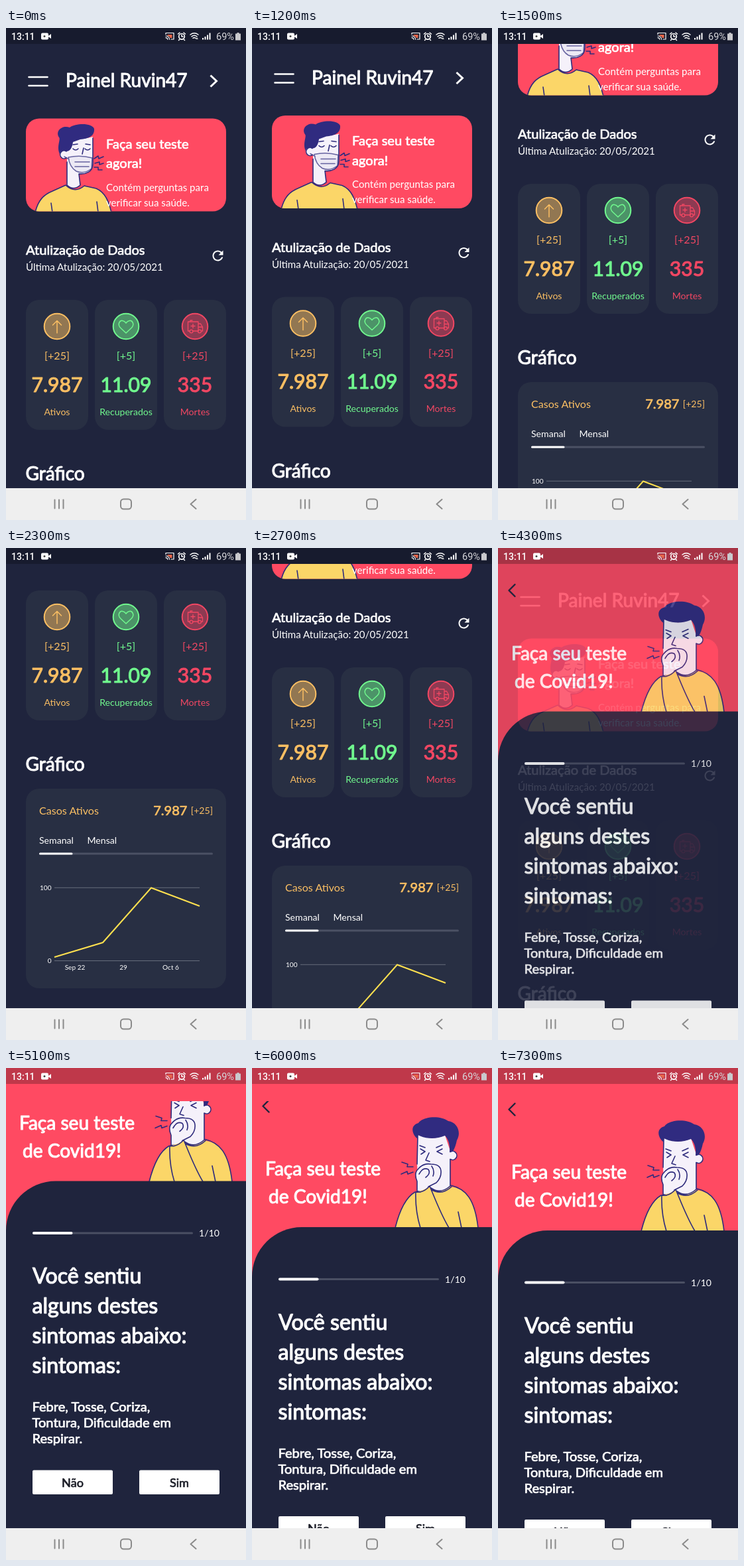
Recreate the animation shown at these times as an HTML page. Size 362x742 px, loop 7.4 s.

```html
<!DOCTYPE html>
<html lang="pt">
<head>
<meta charset="utf-8">
<title>Painel</title>
<style>
  html, body { margin: 0; width: 100%; height: 100%; overflow: hidden; background: #1f243d; }
  svg { display: block; }
  text { font-family: Lato, sans-serif; fill: currentColor; white-space: pre; }
  .bold { stroke: currentColor; stroke-width: .037em; stroke-linejoin: round; }
  .mid { text-anchor: middle; }
  .end { text-anchor: end; }
  .line { fill: none; stroke: currentColor; stroke-linecap: round; stroke-linejoin: round; }
  .ink { fill: none; stroke: #2d2a7c; stroke-width: 1.6; stroke-linecap: round; stroke-linejoin: round; }
  .hair { fill: #302b80; }
  .skin { fill: #f5f1fa; }
  .shirt { fill: #fbd668; }
  .white { color: #fff; }
  .navy { color: #1f243d; }
  .orange { color: #fbbf63; }
  .green { color: #70f88e; }
  .red { color: #f24763; }
  .f10 { font-size: 10.1px; }
  .f14 { font-size: 14.1px; }
  .f15 { font-size: 15.1px; }
  .f16 { font-size: 16.1px; }
  .f18 { font-size: 18.1px; }
  .f20 { font-size: 20.1px; }
  .f28 { font-size: 28.1px; }
  .f30 { font-size: 30.1px; }
  .f32 { font-size: 32.2px; }
  .status text { font-family: Roboto, sans-serif; }
</style>
</head>
<body>
<svg width="362" height="742" viewBox="0 0 362 742" class="white">
  <defs>
    <clipPath id="homeClip"><rect y="24" width="362" height="670"/></clipPath>
    <clipPath id="quizClip"><rect y="50" width="362" height="700"/></clipPath>
    <clipPath id="bannerClip"><rect x="30" y="136.5" width="302" height="140" rx="20"/></clipPath>
    <g id="tile">
      <rect width="94" height="196" rx="20" fill="#282f43"/>
      <circle cx="47" cy="40" r="19.3" fill="currentColor" fill-opacity=".5" stroke="currentColor" stroke-width="2"/>
    </g>
  </defs>

  <rect width="362" height="694" fill="#1f243d"/>

  <g clip-path="url(#homeClip)">
    <g id="home">
      <path class="line" stroke-width="2.6" d="M34.500 74H62.500M34.500 87H62.500"/>
      <text class="bold f28" x="90" y="89">Painel Ruvin47</text>
      <path class="line" stroke-width="3" style="stroke-linecap:butt;stroke-linejoin:miter" d="M308.500 71.500L317.500 80L308.500 88.500"/>

      <g clip-path="url(#bannerClip)">
        <rect x="30" y="136" width="302" height="141" fill="#ff4a62"/>
        <path class="shirt" d="M44 278C49 258 58 251 70 246L90 237Q104 250 118 238L136 242C150 248 155 262 159 278Z"/>
        <path class="ink" d="M44 278C49 258 58 251 70 246L90 237Q104 250 118 238L136 242C150 248 155 262 159 278M70 278L68 264M139 278L137 262"/>
        <path class="skin" d="M86 172C100 166 118 168 131 164V205C131 217 120 221 110 220L112 237Q102 246 92 237V198Z"/>
        <path class="ink" d="M131 166V205C131 217 120 221 110 220L112 237Q102 246 92 237V202"/>
        <path class="hair" d="M82 192C75 180 83 168 80 165C74 156 84 146 96 150C106 143 130 143 133 152C134 163 124 167 112 168L101 172C100 180 97 186 91 186Z"/>
        <circle class="skin" cx="87" cy="191" r="6"/>
        <path class="ink" d="M91 186A6 6 0 1 0 91 196"/>
        <path d="M94 195Q112 192 130 196L129 212Q118 221 106 216Q96 210 94 195Z" fill="#ece9f4"/>
        <path class="ink" stroke-opacity=".7" d="M94 195Q112 191 130 196L129 212Q118 221 106 216Q96 210 94 195ZM104 202H126M104 209H125M88 194L95 198"/>
        <path class="ink" d="M101 182Q105 186 109 182M119 182Q123 186 127 182M101 176L108 175M120 175L127 176M117 181L115 190"/>
        <path class="ink" d="M133 197L139 193L140 197L147 194M134 204L141 202L141 206L147 204M133 210L139 210L139 214L145 214"/>
        <text class="bold f20" x="151" y="181.500">Faça seu teste</text>
        <text class="bold f20" x="151" y="211">agora!</text>
        <text class="f15" x="151" y="245.800">Contém perguntas para</text>
        <text class="f15" x="151" y="268.800">verificar sua saúde.</text>
      </g>

      <text class="bold f20" x="30" y="342">Atulização de Dados</text>
      <text class="f15" x="30" y="366">Última Atulização: 20/05/2021</text>
      <path transform="translate(307.500 331.500)" fill="#fff" d="M17.650 6.350C16.200 4.900 14.210 4 12 4c-4.420 0-7.990 3.580-7.990 8s3.570 8 7.990 8c3.730 0 6.840-2.550 7.730-6h-2.080c-.82 2.330-3.040 4-5.650 4-3.310 0-6-2.690-6-6s2.690-6 6-6c1.660 0 3.140.69 4.220 1.780L13 11h7V4z"/>

      <g class="orange" transform="translate(30 410)">
        <use href="#tile"/>
        <path class="line" stroke-width="1.500" d="M47 50V31.500M40.500 38L47 31.500L53.500 38"/>
        <text class="mid f16" x="47" y="90">[+25]</text>
        <text class="mid bold f30" x="47" y="138.800">7.987</text>
        <text class="mid f14" x="47" y="173.500">Ativos</text>
      </g>
      <g class="green" transform="translate(134 410)">
        <use href="#tile"/>
        <path class="line" stroke-width="1.500" d="M47 50L39 42.500C33 36.500 38 30.500 42 31.500Q45 32 47 35Q49 32 52 31.500C56 30.500 61 36.500 55 42.500Z"/>
        <text class="mid f16" x="47" y="90">[+5]</text>
        <text class="mid bold f30" x="47" y="138.800">11.09</text>
        <text class="mid f14" x="47" y="173.500">Recuperados</text>
      </g>
      <g class="red" transform="translate(238 410)">
        <use href="#tile"/>
        <path class="line" stroke-width="1.300" d="M39 47H36.500V33H52V47H44M52 36H55.500L58.500 41V47H57M52 41H58M44 36.500V42.500M41 39.500H47M40 33V31H43"/>
        <circle class="line" stroke-width="1.300" cx="41.500" cy="47.500" r="2.400"/>
        <circle class="line" stroke-width="1.300" cx="54" cy="47.500" r="2.400"/>
        <text class="mid f16" x="47" y="90">[+25]</text>
        <text class="mid bold f30" x="47" y="138.800">335</text>
        <text class="mid f14" x="47" y="173.500">Mortes</text>
      </g>

      <text class="bold f28" x="29.500" y="682">Gráfico</text>
      <rect x="30" y="709" width="302" height="301" rx="20" fill="#282f43"/>
      <g class="orange">
        <text class="f16" x="50" y="747.500">Casos Ativos</text>
        <text class="end bold f20" x="273.500" y="749">7.987</text>
        <text class="end f14" x="312" y="746.500">[+25]</text>
      </g>
      <text class="f14" x="50" y="792">Semanal</text>
      <text class="f14" x="122.500" y="792">Mensal</text>
      <rect x="50" y="805.500" width="262" height="3" rx="1.500" fill="#4b5164"/>
      <rect x="50" y="805.500" width="50.500" height="3" rx="1.500" fill="#fff"/>
      <path d="M73 858.300H292M73 968.500H292" stroke="#666c7b" fill="none"/>
      <path d="M73 963L146 941L219 858.500L292 886" stroke="#ffe14f" stroke-width="2" fill="none"/>
      <g class="f10">
        <text class="end" x="68.500" y="861.800">100</text>
        <text class="end" x="68.500" y="972">0</text>
        <text class="mid" x="104" y="981.700">Sep 22</text>
        <text class="mid" x="177" y="981.700">29</text>
        <text class="mid" x="248.500" y="981.700">Oct 6</text>
      </g>
    </g>
    <ellipse id="glowTop" cx="181" cy="24" rx="270" ry="17" fill="#2f80b4"/>
    <ellipse id="glowBottom" cx="181" cy="694" rx="270" ry="17" fill="#2f80b4"/>
  </g>

  <g id="quiz">
    <rect width="362" height="742" fill="#ff4a62"/>
    <g clip-path="url(#quizClip)">
      <g id="quizPage">
        <path class="line navy" stroke-width="2.400" d="M25.500 53.500L16.500 62.500L25.500 71.500"/>
        <text class="bold f28" x="20" y="167">Faça seu teste</text>
        <text class="bold f28" x="25" y="209">de Covid19!</text>

        <path class="shirt" d="M216 246C222 222 232 200 246 192L268 184H300C322 187 336 202 341 246Z"/>
        <path class="ink" d="M216 246C222 222 232 200 246 192M300 182C322 187 336 202 341 246M316 246L311 222"/>
        <path class="skin" d="M250 104C264 113 278 112 291 106L299 130V184Q285 196 268 186L260 176Q249 170 249 150Z"/>
        <path class="ink" d="M250 106L249 150M299 143V183Q284 196 270 186"/>
        <circle class="skin" cx="302" cy="137" r="6.500"/>
        <path class="ink" d="M299 131.500A6.500 6.500 0 1 1 299 142.500"/>
        <path class="hair" d="M250 112C240 104 239 91 251 88C257 78 284 76 296 85C310 87 316 102 309 114Q307 124 303 131L298 132C299 120 296 112 291 107C277 113 262 112 250 106Z"/>
        <path class="ink" d="M254 127L261 131L255 135M287 127L279 131L287 135M253 122L261 125M278 125L287 121M267 133L262 144L268 146"/>
        <path class="shirt" d="M247 192L268 183C276 202 284 224 297 246H254Q246 220 247 192Z"/>
        <path class="ink" d="M247 192L268 183C276 202 284 224 297 246M247 192Q246 220 254 246M247 192Q258 194 268 183M270 188Q286 198 301 184"/>
        <path class="skin" d="M249 190V176Q244 164 250 158Q258 148 270 150Q284 150 285 160Q286 170 278 178L266 184Q258 191 249 190Z"/>
        <path class="ink" d="M249 190V176Q244 164 250 158Q258 148 270 150Q284 150 285 160Q286 170 278 178L266 184M252 165Q258 154 266 158Q270 164 262 170M271 153Q276 160 273 168"/>
        <path class="ink" d="M226 147L235 150L234 154L243 154M225 165L234 161L235 165L243 162"/>

        <path d="M0 800V320A75 75 0 0 1 75 245H362V800Z" fill="#1f243d"/>
        <rect x="40" y="322" width="242" height="3" rx="1.500" fill="#4a4f63"/>
        <rect x="40" y="321.500" width="60.500" height="4" rx="2" fill="#fff"/>
        <text class="end f14" x="322" y="328.500">1/10</text>
        <g class="bold f32">
          <text x="40" y="399.500">Você sentiu</text>
          <text x="39.500" y="444.500">alguns destes</text>
          <text x="39.500" y="489.500">sintomas abaixo:</text>
          <text x="39.500" y="534.500">sintomas:</text>
        </g>
        <g class="bold f20">
          <text x="39.500" y="592.500">Febre, Tosse, Coriza,</text>
          <text x="39.500" y="616.700">Tontura, Dificuldade em</text>
          <text x="39.500" y="640.800">Respirar.</text>
        </g>
        <rect x="40" y="681" width="121" height="36.500" rx="2" fill="#fff"/>
        <rect x="201" y="681" width="121" height="36.500" rx="2" fill="#fff"/>
        <g class="mid bold f18" color="#1a1c26">
          <text x="100.500" y="706">Não</text>
          <text x="261.500" y="706">Sim</text>
        </g>
      </g>
    </g>
  </g>

  <g class="status">
    <rect width="362" height="24" fill="#000" fill-opacity=".25"/>
    <text x="8" y="17.500" font-size="14" font-weight="500">13:11</text>
    <rect x="53" y="7.500" width="11" height="10" rx="2" fill="#fff"/>
    <path d="M63 12.500L68 9V16Z" fill="#fff"/>
    <circle cx="58" cy="12.500" r="1.500" fill="#444"/>
    <path d="M243.500 10H250.500V15H247.500Q247 12 243.500 11.500Z" fill="#e8674a"/>
    <path class="line" stroke-width="1.200" d="M241 9.500V7.500H253V17H249M241 12Q246 12 246.500 17.200M241 14.700Q243.500 14.700 243.800 17.200"/>
    <circle class="line" stroke-width="1.700" cx="265" cy="12.800" r="4.300"/>
    <path class="line" stroke-width="1.500" d="M259.500 9L262 7M270.500 9L268 7M265 10.500V13H267M261.500 17.500L260.500 18.500M268.500 17.500L269.500 18.500"/>
    <path class="line" stroke-width="1.500" d="M278 10Q284 5.500 290 10M280 12.800Q284 9.800 288 12.800M282 15.300Q284 13.800 286 15.300"/>
    <path d="M288 14L290 17H286Z" fill="#ccc"/>
    <path d="M297 17.500V15M300.500 17.500V13M304 17.500V10.500M307.500 17.500V7.500" stroke="#fff" stroke-width="2"/>
    <text x="317" y="17.500" font-size="14.500" color="#d6d6da">69%</text>
    <path d="M348.500 7H351.500V8.500H354V18.500H346V8.500H348.500Z" fill="#c9c9cd"/>
  </g>

  <g color="#8b8b8b">
    <rect y="694" width="362" height="48" fill="#efefef"/>
    <path class="line" stroke-width="2" d="M73.500 711.500V724.500M80 711.500V724.500M86.500 711.500V724.500"/>
    <rect class="line" stroke-width="2" x="173" y="710.500" width="16" height="15" rx="4.500"/>
    <path class="line" stroke-width="2" d="M286.500 711L278.500 718L286.500 725"/>
  </g>
</svg>
<script>
  const LOOP = 7400, STEP = 100;
  const byId = id => document.getElementById(id);
  const [home, quiz, quizPage, glowTop, glowBottom] =
    ['home', 'quiz', 'quizPage', 'glowTop', 'glowBottom'].map(byId);

  // Each track lists [ms, value] points.
  const homeScroll = [[800, 0], [1200, 4.5], [1300, 32], [1400, 95], [1500, 175], [1600, 250],
    [1700, 305], [1800, 335], [1900, 346], [2500, 346], [2600, 325], [2700, 230], [2800, 105],
    [2900, 25], [3000, 0]];
  const quizScroll = [[4700, 0], [4800, 12], [4900, 42], [5000, 66], [5100, 74.5],
    [5600, 74.5], [5700, 68], [5800, 46], [5900, 20], [6000, 5], [6100, 0]];
  const topGlow = [[2900, 0], [3000, .3], [3100, .2], [3300, 0]];
  const bottomGlow = [[1800, 0], [1900, .2], [2200, 0]];
  const fade = [[0, 0], [.5, .25], [.9, .7], [1, 1]];

  function at(track, x) {
    const next = track.findIndex(point => point[0] > x);
    if (next === 0) return track[0][1];
    if (next < 0) return track[track.length - 1][1];
    const [x0, y0] = track[next - 1], [x1, y1] = track[next];
    return y0 + (y1 - y0) * (x - x0) / (x1 - x0);
  }

  const moveY = (node, y) => node.setAttribute('transform', `translate(0 ${y.toFixed(2)})`);

  function render(ms) {
    const t = Math.floor((ms % LOOP) / STEP) * STEP;
    const open = 1 - (1 - Math.min(1, Math.max(0, (t - 4140) / 350))) ** 5;
    moveY(home, -at(homeScroll, t));
    moveY(quizPage, 32 * (1 - open) - at(quizScroll, t));
    quiz.setAttribute('opacity', at(fade, open));
    glowTop.setAttribute('opacity', at(topGlow, t));
    glowBottom.setAttribute('opacity', at(bottomGlow, t));
  }

  const start = performance.now();
  function tick() {
    render(performance.now() - start);
    requestAnimationFrame(tick);
  }
  tick();
</script>
</body>
</html>
```
